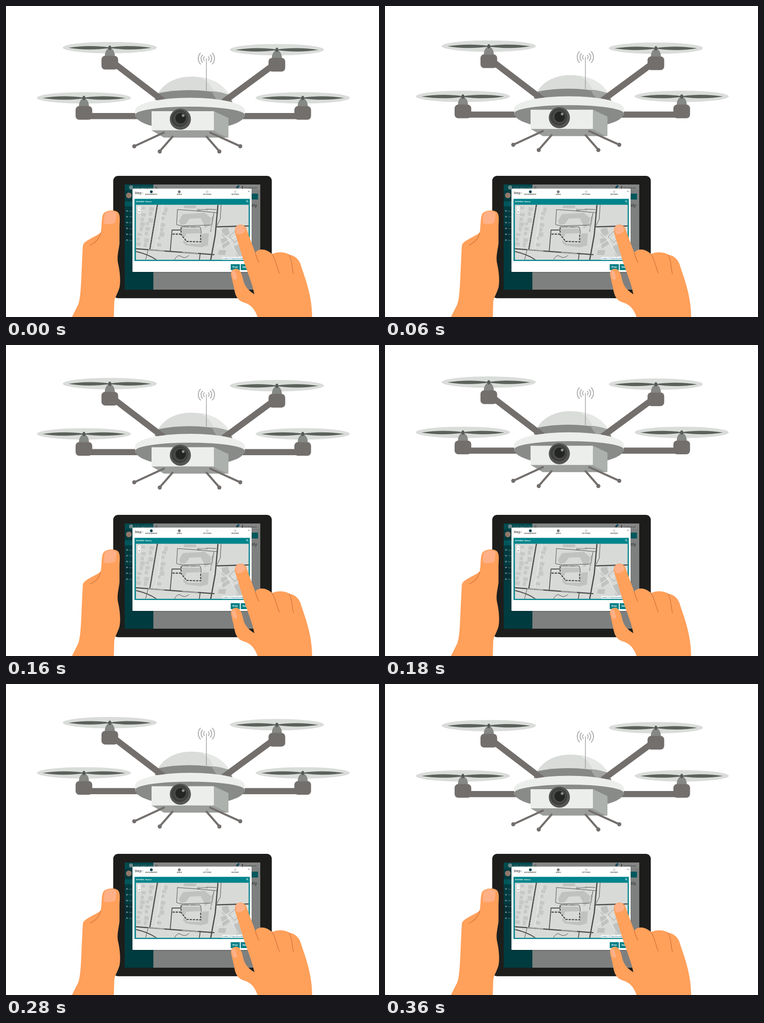
Write an HTML page that moves like this. It is 820 by 683 pixels and loops after 420 ms.

```html
<!DOCTYPE html>
<html lang="en">
<head>
<meta charset="utf-8">
<title>Drone and tablet</title>
<style>
  html, body { margin: 0; width: 100%; height: 100%; overflow: hidden; background: #fff; }
  svg { display: block; width: 100vw; height: 100vh; }
  text { font-family: "Open Sans", sans-serif; }
  .line { fill: none; stroke-linecap: round; stroke-linejoin: round; }
</style>
</head>
<body>
<svg viewBox="0 0 820 683">
  <defs>
    <g id="rotor">
      <ellipse cy=".4" rx="103.4" ry="12.5" fill="#d9dcd9"/>
      <path d="M-11 19C-11 10-7 4-3 2H3C7 4 11 10 11 19Z" fill="#858885"/>
      <path d="M-91 .8C-65-3-35-5 0 0C35-5 65-3 91 .8C65 5 35 6 0 1.6C-35 6-65 5-91 .8Z" fill="#5c615c"/>
      <ellipse cy=".8" rx="3.4" ry="4.8" fill="#555a56"/>
      <rect x="-18.3" y="18.5" width="36.6" height="30" rx="8" fill="#736f6d"/>
    </g>
    <clipPath id="screen"><rect x="261" y="392" width="298" height="231"/></clipPath>
    <clipPath id="map"><rect x="285.5" y="436.5" width="248" height="121"/></clipPath>
    <filter id="shadow"><feDropShadow dx="0" dy="1" stdDeviation="1.2" flood-opacity=".3"/></filter>
  </defs>

  <g id="drone">
    <path d="M327 206C341 170 373 155 407 155C451 155 487 176 498 211L404 225Z" fill="#d9dcd9"/>
    <path d="M427 156C463 161 484 180 492 198L456 188C452 176 443 164 427 156Z" fill="#e6e8e5"/>
    <path d="M327 206Q330 197 337 191Q407 177 487 194Q495 202 498 213L404 225Z" fill="#868986"/>
    <path d="M452 187Q470 188 487 194L482 208H465Q457 198 452 187Z" fill="#a2a5a2"/>
    <path d="M440.5 115V186" stroke="#929592" stroke-width="1.3"/>
    <g id="waves" class="line" stroke="#b1b3b1" stroke-width="2.2"></g>

    <g stroke="#736f6d" stroke-width="13.5">
      <path d="M236 124.5L346 208.5M588 129.5L478 210.5M180 241.7H292M518 241.7H644"/>
    </g>
    <path d="M284 229A120.5 27.5 0 0 1 525 229V242H284Z" fill="#eceeeb"/>
    <path d="M284 239A120.5 18 0 0 1 525 239A120.5 34 0 0 1 284 239Z" fill="#888b88"/>
    <path d="M457 231L489 246V289L457 273Z" fill="#adb1ad"/>
    <path d="M320 273H457L489 289H347Z" fill="#9b9e9b"/>
    <path d="M320 231H457V273H320Z" fill="#eceeeb"/>

    <circle cx="383.3" cy="248.5" r="23.2" fill="#555653"/>
    <circle cx="382" cy="247" r="18.5" fill="#3f403e"/>
    <circle cx="383" cy="247" r="14.5" fill="#494b48"/>
    <circle cx="384" cy="246.5" r="11.5" fill="#242623"/>
    <circle cx="389.5" cy="240.5" r="3" fill="#8b8e8a"/>

    <g class="line" stroke="#736f6d" stroke-width="4.5">
      <path d="M347 278L282 308M366 287L338 319M441 287L469 319M449 278L515 308"/>
    </g>
    <g id="feet" fill="#736f6d"></g>
    <use href="#rotor" x="228.2" y="91"/>
    <use href="#rotor" x="595.5" y="95.5"/>
    <use href="#rotor" x="171.3" y="201.3"/>
    <use href="#rotor" x="652.3" y="201.3"/>
  </g>

  <rect x="235.7" y="373" width="348.6" height="268.8" rx="11" fill="#1d1e1c"/>
  <g clip-path="url(#screen)">
    <rect x="261" y="392" width="298" height="231" fill="#7e807f"/>
    <rect x="324" y="392" width="235" height="12" fill="#858786"/>
    <rect x="261" y="392" width="63" height="231" fill="#003b40"/>
    <rect x="261" y="392" width="63" height="13" fill="#034a4e"/>
    <rect x="261" y="429" width="18" height="11" fill="#00565b"/>
    <rect x="261" y="484" width="18" height="30" fill="#052f34"/>
    <circle cx="275" cy="398.5" r="4.5" fill="#70898c"/>
    <text x="282" y="402" font-size="6.2" fill="#70898c">TOP WATCHMAN</text>
    <circle cx="270" cy="416" r="6.2" fill="#94786a"/>
    <g id="menu" font-size="4.3" fill="#758d90"></g>
    <path d="M328 396.5h5M328 398.5h5M328 400.5h5" stroke="#555" stroke-width=".8"/>
    <path d="M505 400q2-1 2-4h3q0 3 2 4Z" fill="#173d48"/>
    <circle cx="511" cy="395.5" r="2.2" fill="#08546b"/>
    <circle cx="520" cy="396.8" r="1.4" fill="#333"/>
    <path d="M517.5 401q2.5-4 5 0Z" fill="#333"/>
    <text x="524" y="400.5" font-size="4.1" fill="#303030">TOLVEN Ariel▾</text>
    <rect x="530" y="412" width="24" height="13" fill="#00575c"/>
    <text x="530" y="441" font-size="9" font-weight="600" fill="#353737">ently</text>

    <rect x="278" y="401" width="262" height="183" rx="1.5" fill="#fff" filter="url(#shadow)"/>
    <text x="283" y="413" font-size="7" font-weight="600" fill="#333">Step :</text>
    <path d="M323 408H500" stroke="#f3f3f3" stroke-width=".7"/>
    <g id="steps" font-size="4.1" font-weight="700" text-anchor="middle" fill="#555"></g>
    <text x="532.5" y="408.5" font-size="5" font-weight="700" fill="#333">×</text>
    <rect x="282.5" y="423.5" width="253.5" height="136.5" fill="#00848b"/>
    <text x="286" y="430.5" font-size="4.2" font-weight="700" fill="#fff">NOVIDEL Talmes</text>
    <circle cx="530" cy="428.5" r="1.5" fill="none" stroke="#fff" stroke-width=".8"/>
    <path d="M531 429.7l1.6 1.6" stroke="#fff" stroke-width=".9"/>

    <g clip-path="url(#map)">
      <rect x="285" y="436" width="249" height="122" fill="#d8dad8"/>
      <g id="houses" fill="#c6c8c6"></g>
      <g fill="#c0c2c0">
        <path d="M389 457L437 454L451 466L449 480L437 488L434 477L428 466L404 467L395 479L384 481L380 472Z"/>
        <path d="M386 489L428 489V499L396 500L394 508L388 505Z"/>
        <path d="M391 438H418V444H391ZM431 500L446 499L444 526L428 530L396 526L389 519L391 514L399 522L428 522Z"/>
        <path d="M475 489L488 487L492 500L479 508L474 502ZM472 512L484 508L493 522L477 533ZM501 528L520 520L531 545L508 551ZM468 536L484 536L482 547L466 546Z"/>
      </g>
      <g class="line" stroke="#eceeec" stroke-width="1.1">
        <path d="M345 436L329 533M464 487L490 514L516 557M491 514L533 490M464 530L490 514"/>
      </g>
      <g class="line" stroke="#4b4d4c">
        <path d="M333 436L316 536M285 533L361 539L457 546M466 436L460 503L450 558M464 485L534 483" stroke-width="2.7"/>
        <path d="M361 539L365 492H384M425 558L427 543M285 539Q315 546 331 558" stroke-width="1.8"/>
        <path d="M377 447L420 450L464 454M377 447L375 480L386 483L453 481L457 455M420 450L441 446L462 447M473 436L471 468L464 482M370 558Q377 544 385 550T402 548M312 537L307 557" stroke-width="1"/>
        <path d="M386 484L425 485Q430 487 429 500" stroke-width="1.1"/>
        <path d="M491 506L503 495L514 509L503 519ZM514 509L534 525" stroke="#777" stroke-width=".7"/>
        <path d="M366 501H384M385 486V502L397 517L428 518V502" stroke-width="2.4" stroke-dasharray="5 2" stroke-linecap="butt"/>
      </g>
      <path d="M333 441L317 533" stroke="#aaa" stroke-width=".7" stroke-dasharray="2 4"/>
      <g font-size="3.6" font-weight="600" fill="#494b4a" stroke="#e5e6e5" stroke-width=".7" paint-order="stroke">
        <text transform="translate(313 537) rotate(4)">RUE DES ORVANNES</text>
        <text transform="translate(387 543) rotate(4)">RUE DES ORVANNES</text>
        <text x="386" y="487">Allée des Tilvannes</text>
        <text transform="translate(451 496) rotate(-83)">Allée des Brumelles</text>
        <text transform="translate(420 448) rotate(2)">Allée Tilvanne</text>
      </g>
      <rect x="475" y="551" width="59" height="7" fill="#f4f5f4"/>
      <text x="476.5" y="556" font-size="3.8" fill="#126b92">Leaflet | © OpenStreetMap contributors</text>
      <rect x="289" y="439.5" width="7.5" height="16.5" rx="1" fill="#fff" stroke="#b5b7b5" stroke-width=".6"/>
      <path d="M289 447.7H296.5" stroke="#ccc" stroke-width=".6"/>
      <path d="M291.5 443.7h3M293 442.2v3" stroke="#999" stroke-width=".7"/>
      <path d="M291.3 452h3.3" stroke="#222"/>
    </g>
    <path d="M494 567H514V580H494ZM516 567H536V580H516Z" fill="#007f86"/>
    <g font-size="5.3" font-weight="700" fill="#fff">
      <text x="498" y="575.3">Prev</text><text x="520" y="575.3">Next</text>
    </g>
  </g>

  <g fill="#ffa05b">
    <path d="M145 683L159 655C166 636 165 590 169 526C171 515 197 507 208 498C211 486 209 470 213 458C217 448 241 446 247 454C252 461 249.500 474 249.500 487V522C247 540 243 553 247 568C251 586 252 606 249.500 618C246 631 239 640 238 650L237 683Z"/>
    <path d="M504 500C501 487 507 480 515 480C523 480 527 484 529 491L548 542C554 532 572 532 585 545C592 540 614 539 622 546C637 548 646 559 649 572C660 604 673 640 673 683H553C547 666 539 656 523 651C508 646 504 636 501 618L495 592C493 581 500 576 507 577C517 580 519 591 522 604C526 618 535 626 546 633C541 606 526 574 518 545Z"/>
  </g>
  <g fill="#ffb087">
    <path d="M216 460C217 450 238 448 243 455L241 474C238 480 218 481 215 476Z"/>
    <path d="M505 491C504 484 509 481 515 481C522 481 526 486 526 493C523 500 511 504 506 499Z"/>
    <path d="M496 586C497 580 502 579 504 583L508 597C507 602 501 602 499 598Z"/>
  </g>
  <g class="line" stroke="#cb6f36" stroke-width="1.2">
    <path d="M208 498C206 510 198 519 185 525M548 542Q552 556 556 563M585 545C593 557 595 574 601 587M622 546C630 558 628 576 632 588"/>
  </g>
</svg>

<script>
const $ = id => document.getElementById(id);
const fill = (id, items, draw) => { $(id).innerHTML = items.map(draw).join(""); };

fill("waves", [6, 11.5, 17.5], r => {
  const x = r * .75, y = r * .68;
  return [-1, 1].map(s =>
    `<path d="M${440.5 + s * x} ${115.5 - y}A${r} ${r} 0 0 ${s > 0 ? 1 : 0} ${440.5 + s * x} ${115.5 + y}"/>`).join("");
});
fill("feet", [[282, 308], [338, 319.5], [469, 319.5], [515, 308]],
  ([x, y]) => `<circle cx="${x}" cy="${y}" r="4.5"/>`);
fill("menu", ["Dashboard", "Cameras", "Alerts", "System", "Missions", "History"], (label, i) => {
  const y = 450 + i * 12.8;
  return `<circle cx="266" cy="${y}" r="1.8"/><text x="270" y="${y + 1.6}">${label}</text>`;
});
fill("steps", [["ASSIGNMENT", "#003d49"], ["AREA", "#777"], ["OPTIONS", "#ddd"], ["RESUME", "#ddd"]],
  ([label, color], i) => {
    const x = 319.5 + i * 61.4;
    return `<circle cx="${x}" cy="408" r="3" fill="${color}"/><text x="${x}" y="415">${label}</text>`;
  });

// Small houses follow both sides of the slanted street.
fill("houses", Array.from({ length: 24 }, (_, i) => i), i => {
  const row = Math.floor(i / 3), col = i % 3;
  const x = [299, 314, 345][col] - row * 2 + (i * 7 % 5);
  const y = 440 + row * 11 + (i * 5 % 4);
  return `<rect x="${x}" y="${y}" width="${7 + i * 3 % 6}" height="${6 + i * 7 % 5}" transform="rotate(10 ${x} ${y})"/>`;
});

const STEP = 60, STEPS = 7, LIFT = 9.8;

function render(time) {
  const step = Math.floor(time / STEP) % STEPS;
  const rise = LIFT * (1 - Math.abs(step - 3) / 3);
  $("drone").setAttribute("transform", `translate(0 ${-rise})`);
}

const start = performance.now();
function tick(now) {
  render(Math.max(0, now - start));
  requestAnimationFrame(tick);
}
render(0);
requestAnimationFrame(tick);
</script>
</body>
</html>
```
